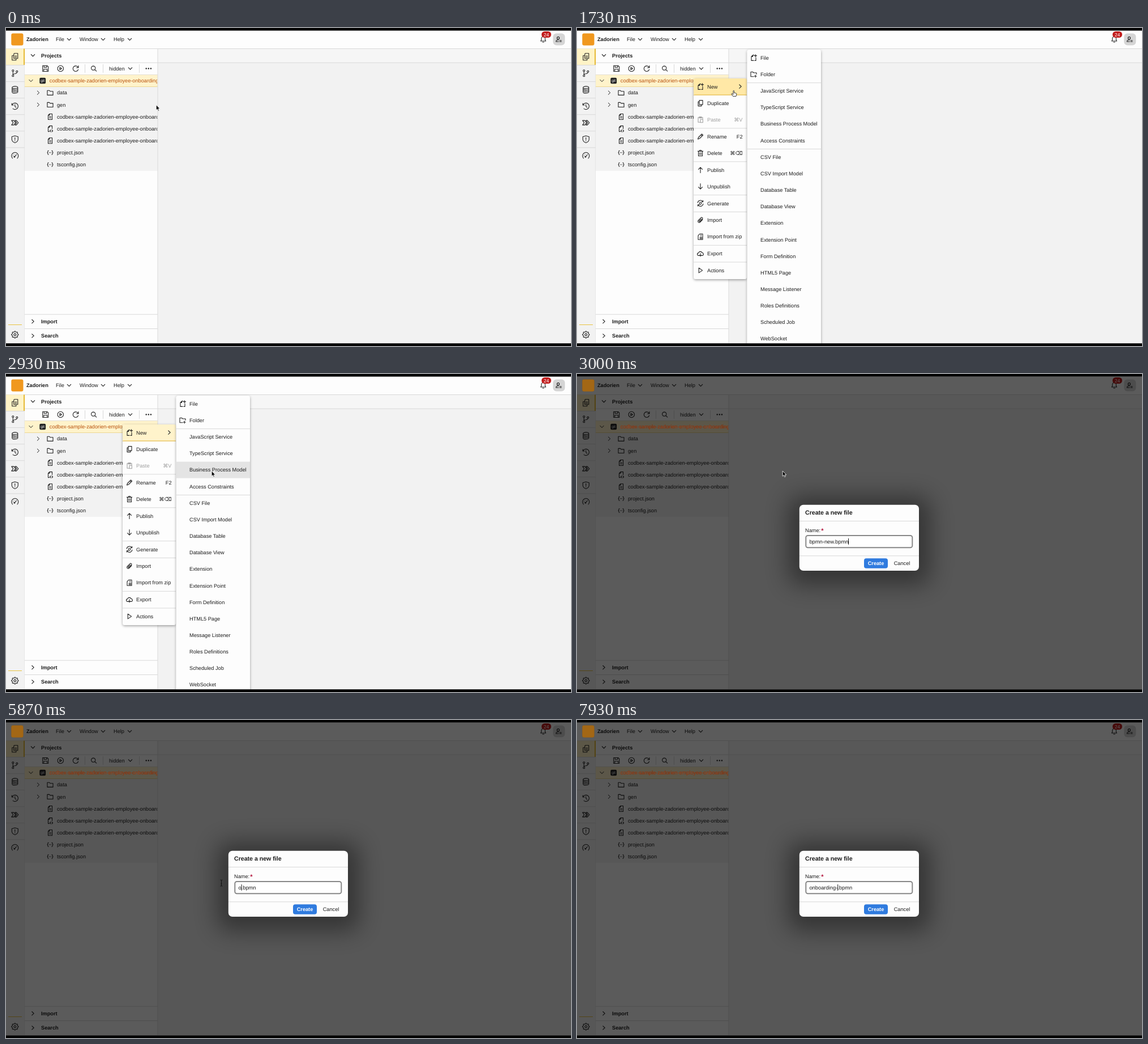
Animation, 998 px wide and 561 px high, one loop 8 s. Source, as an HTML page:

```html
<!DOCTYPE html>
<html lang="en">
<head>
<meta charset="utf-8">
<title>Project workbench</title>
<style>
html, body { margin: 0; width: 998px; height: 561px; overflow: hidden; background: #000 }
svg { display: block }
text { font: 9.2px "Liberation Sans", Arial, "DejaVu Sans", sans-serif; fill: #1c1c1c; text-rendering: geometricPrecision; white-space: pre }
.b { font-weight: 700 }
.i { fill: none; stroke: #222; stroke-width: 1.1; stroke-linejoin: round; stroke-linecap: round }
.off { opacity: .42 }
</style>
</head>
<body>
<svg id="stage" width="998" height="561" viewBox="0 0 998 561"></svg>
<script>
const rect = (x, y, w, h, fill, more = '') =>
  `<rect x="${x}" y="${y}" width="${w}" height="${h}" fill="${fill}" ${more}/>`;
const text = (x, cy, s, more = '') => `<text x="${x}" y="${cy + 3.2}" ${more}>${s}</text>`;
const icon = (x, y, d, more = '') => `<path class="i" transform="translate(${x} ${y})" d="${d}" ${more}/>`;
const group = (id, body) => `<g id="${id}">${body}</g>`;
const ring = (x, y, r) => `M${x - r} ${y}a${r} ${r} 0 1 0 ${2 * r} 0a${r} ${r} 0 1 0 ${-2 * r} 0`;
const hline = (x, y, w, c = '#d9d9d9') => rect(x, y, w, 1, c);
const vline = (x, y, h, c = '#d9d9d9') => rect(x, y, 1, h, c);

const down = 'M-3.2-1.7L0 1.7 3.2-1.7', right = 'M-1.7-3.2L1.7 0-1.7 3.2';
const gear = 'M' + Array.from({ length: 32 }, (_, i) => {
  const a = (i - .5) * Math.PI / 16, r = i % 4 < 2 ? 6.1 : 4.8;
  return (r * Math.cos(a)).toFixed(2) + ' ' + (r * Math.sin(a)).toFixed(2);
}).join('L') + 'Z' + ring(0, 0, 1.9);
const folder = 'M-5-4H-1.5L0-2.5H5V4.2H-5Z';
const doc = 'M-1-5H3.5V5H-3.5V-2.5ZM-3.5-2.5H-1V-5M-1.5 0H1.5M-1.5 2.3H1.5';
const code = 'M-1-5H3.5V0M-3.5 5V-2.5L-1-5M-3.5-2.5H-1V-5M-3.5 5H-1.8M1 2.3L-.6 3.9 1 5.5M3 2.3L4.6 3.9 3 5.5';
const json = 'M-3-3.5C-5-3.5-3.4 0-5 0C-3.4 0-5 3.5-3 3.5M3-3.5C5-3.5 3.4 0 5 0C3.4 0 5 3.5 3 3.5M-1.5 0h.5M1 0h.5';
const newDoc = 'M0 5H-4V-2L-1.5-4.5H1M-4-2H-1.5V-4.5M4 0V5H2M3.5-5.5V-1.5M1.5-3.5H5.5';

const side = [
  'M-1-6H5V3H-2V-4.8ZM-2-2H-5V6H2V3M0-1.5H3M0 .8H3',
  'M-3.5-3V3M3.5-1.5C3.5 2-3.5 0-3.5 3' + ring(-3.5, -4.5, 1.5) + ring(-3.5, 4.5, 1.5) + ring(3.5, -3, 1.5),
  'M-5-4a5 2 0 1 0 10 0a5 2 0 1 0-10 0V4a5 2 0 0 0 10 0V-4M-5-1.3a5 2 0 0 0 10 0M-5 1.4a5 2 0 0 0 10 0',
  'M-5.2-2A5.6 5.6 0 1 1-3.6 4.3M-5.5-5V-2H-2.5M0-3V.3L2 2',
  'M-6-4H-2L1 0-2 4H-6L-3 0ZM0-4H2.5L6 0 2.5 4H0L3 0Z',
  'M0-6L5.5-4.5V0C5.5 3 3 5.2 0 6.2-3 5.2-5.5 3-5.5 0V-4.5ZM0-3V.7M0 2.5V3',
  'M-4.2 4.5A6 6 0 1 1 4.2 4.5M-.5 1.5L2.6-2M-3.4 0h.1M-1.8-2.6h.1' + ring(-.9, 2, .9)
];
const tools = [
  [69.7, 'M-5-5H3L5-3V5H-5ZM-2.5-5V-2H2V-5M-3 5V1H3V5'],
  [96.3, ring(0, 0, 5.2) + 'M-1.3-2L2.2 0-1.3 2Z'],
  [123, 'M4.6-1.5A4.8 4.8 0 1 0 4.6 1.8M4.9-5V-1.5H1.5'],
  [155, ring(-.8, -.8, 3.6) + 'M1.8 1.8L4.7 4.7']
];
const project = 'codbex-sample-zadorien-employee-onboarding';
const tree = [[folder, 'data'], [folder, 'gen'], [doc, project], [code, project], [doc, project],
  [json, 'project.json'], [json, 'tsconfig.json']];

function base() {
  let s = rect(0, 0, 998, 561, '#f2f2f2') + rect(0, 0, 998, 36, '#fdfdfd') + hline(0, 36, 998);
  s += rect(9.3, 9.5, 21.2, 21.2, '#f0981f', 'rx="3"') + text(36, 20, 'Zadorien', 'class="b"');
  for (const [x, label, cx] of [[88, 'File', 111.5], [130, 'Window', 171.5], [190, 'Help', 218.5]])
    s += text(x, 20, label) + icon(cx, 20, down);
  s += icon(949, 20, 'M-4.5 3H4.5L3.3 1V-1.5A3.3 3.3 0 0 0-3.3-1.5V1ZM-1.3 5H1.3');
  s += rect(946, 6, 17, 11, '#c11b1b', 'rx="5.5"') + text(954.5, 11.5, '24', 'text-anchor="middle" style="fill:#fff;font-size:8.6px"');
  s += rect(966.3, 9.5, 21, 21, '#d5d5d5', 'rx="6"') +
    icon(976, 20, ring(-.6, -2.3, 2.1) + 'M-4.5 4C-4.5.7-1.5.8 0 1.2M-4.5 4H0M2 2H5M2 4H5');

  s += vline(32.5, 36, 520) + rect(0, 36.5, 33, 29, '#fff3c6') + rect(31.2, 36.5, 1.8, 29, '#e3b322');
  side.forEach((d, i) => {
    s += icon(15.8, 50.7 + i * 29.1, d);
    if (i < 6) s += hline(0, 65 + i * 29.1, 33);
  });
  s += hline(4, 523, 24, '#e9c33f') + icon(15.8, 541, gear);

  s += rect(33, 36.5, 235, 519.5, '#fdfdfd') + hline(33, 36, 235) + rect(268, 37, 730, 24, '#f6f6f6');
  s += icon(47.5, 48.3, down) + text(62, 48.3, 'Projects', 'class="b"') + hline(33, 60.7, 965);
  for (const [x, d] of tools) s += icon(x, 71.5, d);
  for (const x of [139, 171, 235]) s += vline(x, 64, 15);
  s += text(182, 71.5, 'hidden') + icon(219.5, 71.5, down);
  for (const x of [247.7, 251.8, 255.9]) s += `<circle cx="${x}" cy="71.5" r="1.2" fill="#222"/>`;

  s += rect(33, 82, 235, 170, '#f2f2f2') + rect(33, 82.3, 235, 21, '#fff3cb') +
    hline(33, 82, 235, '#e5e0d0') + hline(33, 103, 235, '#ecd894');
  s += icon(44, 93, down, 'style="stroke-width:1"') + rect(59.3, 87.8, 10.8, 10.5, '#222', 'rx="2"') +
    text(64.7, 92.2, 'git', 'text-anchor="middle" style="fill:#fff;font-size:6.6px"');
  let rows = text(76.8, 93, project, 'style="fill:#b8520c"');
  tree.forEach(([d, label], i) => {
    const y = 114.2 + i * 21.13;
    rows += icon(78, y, d) + text(90, y, label);
    if (i < 2) rows += icon(57, y, right, 'style="stroke-width:1"');
  });
  s += `<g clip-path="url(#panel)">${rows}</g>`;
  [[517.7, 'Import'], [543, 'Search']].forEach(([y, label]) => {
    s += hline(33, y - 13, 235) + icon(47.5, y, right) + text(62, y, label, 'class="b"');
  });
  return s + vline(267.5, 36, 520);
}

const actions = [
  ['New', newDoc], ['Duplicate', 'M-2-5H4V2.5H-2ZM-2-2.5H-4V5H2V2.5'],
  ['Paste', 'M-1 4.5H-4V-4H4V-1.5M-2-5H2V-3H-2ZM0-.5H4.3V5H0Z', '⌘V'],
  ['Rename', 'M-4.5 4.5L-3.5 1.5 2.5-4.5 4.5-2.5-1.5 3.5ZM1-3L3-1', 'F2'],
  ['Delete', 'M-4.5-3.3H4.5M-1.5-3.3V-5H1.5V-3.3M-3.5-3.3V5H3.5V-3.3M-1.2-1V3M1.2-1V3', '⌘⌫'],
  ['Publish', 'M0 5V-4.5M-3.5-1L0-4.5 3.5-1'], ['Unpublish', 'M0-5V4.5M-3.5 1L0 4.5 3.5 1'],
  ['Generate', 'M-4.8-1A4.8 4.8 0 0 1 4-3M4.6-5V-2.6H2M4.8 1A4.8 4.8 0 0 1-4 3M-4.6 5V2.6H-2' + ring(0, 0, 1.8)],
  ['Import', 'M3.8-1L-.8 3.8A2.3 2.3 0 0 1-4 .6L1-4.3A1.7 1.7 0 0 1 3.5-2L-1 2.3A.8.8 0 0 1-2.2 1L1.3-2.4'],
  ['Import from zip', 'M-1-5H4V5H-4V-2ZM1-4V-3M1-2V-1M-.5 1H2.3V3.5H-.5Z'],
  ['Export', 'M-2 3.5H-3.2A2.2 2.2 0 0 1-3.3-1A3.2 3.2 0 0 1 2.8-1.5A2.5 2.5 0 0 1 3 3.5H2M0 0V4.5M-1.6 3L0 4.5 1.6 3'],
  ['Actions', 'M-2.8-4.3L3.6 0-2.8 4.3Z']
];
const kinds = ['File', 'Folder', 'JavaScript Service', 'TypeScript Service', 'Business Process Model',
  'Access Constraints', 'CSV File', 'CSV Import Model', 'Database Table', 'Database View', 'Extension',
  'Extension Point', 'Form Definition', 'HTML5 Page', 'Message Listener', 'Roles Definitions',
  'Scheduled Job', 'WebSocket'];
const shadow = 'rx="4" filter="url(#soft)"';
const kindY = i => 52.4 + i * 29.1 + (i > 1) * .4 + (i > 5) * .4;

function contextMenu() {
  let s = rect(206, 89, 94, 354, '#fdfdfd', shadow) + rect(206, 89, 94, 29, '#fff3cb', 'id="newRow" rx="3"') +
    hline(206, 117.6, 94, '#dfb02c');
  let y = 103.4;
  actions.forEach(([label, d, keys], i) => {
    const row = icon(218, y, d) + text(230, y, label) +
      (keys ? text(292.5, y, keys, 'text-anchor="end"') : '');
    s += i == 2 ? `<g class="off">${row}</g>` : row;
    y += 29.2;
    if ([2, 4, 6, 7, 9, 10].includes(i)) { s += hline(206, y - 14.6, 94); y += .5; }
  });
  return s + icon(288.5, 103.2, right);
}
function subMenu() {
  let s = rect(300.5, 38.3, 130.5, 540, '#fdfdfd', shadow) + rect(300.5, 0, 130.5, 29, '#e4e4e4', 'id="hover"');
  kinds.forEach((label, i) => s += text(324, kindY(i), label));
  return s + icon(312, 52.4, newDoc) + icon(312, 81.5, 'M0 4.2H-5V-4H-1.5L0-2.5H5V0M3.2 1.5V5.5M1.2 3.5H5.2') +
    hline(300.5, 96.2, 130.5) + hline(300.5, 213, 130.5);
}
function dialog() {
  return rect(0, 4.5, 998, 552, '#000', 'opacity=".64"') +
    rect(9.3, 9.5, 21.2, 21.2, '#f0981f', 'rx="3" opacity=".5"') +
    `<g clip-path="url(#panel)">${text(76.8, 93, project, 'style="fill:#a8421a"')}</g>` +
    rect(373, 216, 251, 156, '#000', 'rx="20" opacity=".4" style="filter:blur(20px)"') +
    rect(392.8, 230.7, 211.2, 116.3, '#fdfdfd', 'rx="7"') +
    text(403, 245, 'Create a new file', 'class="b" style="font-size:10.6px"') + hline(393, 259, 211) +
    text(403, 275.3, 'Name:') + text(431.3, 276.3, '*', 'class="b" style="fill:#b3123a;font-size:11px"') +
    rect(404.3, 285, 188, 21.3, '#fff', 'rx="3.5" stroke="#888" stroke-width="2"') +
    '<rect id="mark" y="289.5" height="12" fill="#b5d5fb"/>' +
    text(410.4, 295.6, '', 'id="field" style="font-size:9.35px"') +
    rect(0, 290, .9, 11, '#000', 'id="caret"') + hline(393, 320.3, 211) +
    rect(507, 325.3, 42, 17.4, '#2f7bdf', 'rx="4"') +
    text(528, 334.1, 'Create', 'class="b" text-anchor="middle" style="fill:#fff"') +
    text(574, 334.1, 'Cancel', 'text-anchor="middle"');
}

const arrow = 'M0 0V9.3L2.1 7.4 3.6 10.7 5.1 10 3.7 6.9H6.6Z';
const hand = 'M-.9.8C-.9-.4.8-.4.8.8V4L3 4.3C5 4.6 5.2 5.2 5 6.5L4.2 10H-1.2L-3.8 6.3C-4.4 5.2-3.3 4.7-2.5 5.5L-.9 7Z';
const beam = 'M-1.8-5.5Q0-5.5 0-4.3Q0-5.5 1.8-5.5M0-4.3V4.3M-1.8 5.5Q0 5.5 0 4.3Q0 5.5 1.8 5.5M-1 1.5H1';
const stage = document.getElementById('stage');
stage.innerHTML = `<defs><clipPath id="panel"><rect x="33" y="36" width="234.5" height="520"/></clipPath>
  <filter id="soft" x="-20%" y="-10%" width="140%" height="120%"><feDropShadow dx="0" dy="1.5" stdDeviation="2.2" flood-opacity=".38"/></filter></defs>` +
  base() + group('context', contextMenu()) + group('sub', subMenu()) +
  rect(0, 0, 998, 4.6, '#000') + rect(0, 556.3, 998, 5, '#000') + group('modal', dialog()) +
  group('cursor', `<path id="pointer" stroke="#fff" stroke-width=".8"/>
    <path id="ibeam" d="${beam}" fill="none" stroke="#111" stroke-width="1"/>`);

const el = id => document.getElementById(id);
const show = (id, on) => el(id).setAttribute('display', on ? 'inline' : 'none');
const set = (id, attrs) => { for (const k in attrs) el(id).setAttribute(k, attrs[k]); };

// time, x, y of the pointer
const path = [[70, 265.3, 135.7], [670, 205.5, 89], [1060, 205.5, 89], [1660, 276.8, 110.5], [1830, 276.8, 110.5],
  [2100, 312, 117], [2600, 363.2, 171], [3270, 363.2, 171], [4070, 452, 294.3], [4670, 452, 294.3], [5130, 380.5, 287.6]];
function pointerAt(t) {
  const i = path.findIndex(p => p[0] > t);
  if (i <= 0) return path[i ? path.length - 1 : 0].slice(1);
  const [a, b] = [path[i - 1], path[i]];
  let k = (t - a[0]) / (b[0] - a[0]);
  k = k * k * (3 - 2 * k);
  return [a[1] + (b[1] - a[1]) * k, a[2] + (b[2] - a[2]) * k];
}

const pen = document.createElement('canvas').getContext('2d');
pen.font = '9.35px "Liberation Sans", Arial, sans-serif';
const edge = s => 410.4 + pen.measureText(s).width;
const oldName = 'bpmn-new', newName = 'onboarding-', suffix = '.bpmn';
const keyTimes = [5870, 6000, 6200, 6450, 6670, 6870, 7000, 7130, 7330, 7470, 7800];

function drawField(t, x) {
  const name = t < 5530 ? oldName : newName.slice(0, keyTimes.filter(k => k <= t).length);
  el('field').textContent = name + suffix;
  const end = edge(name), dragging = t >= 4670 && t < 5530;
  let from = name.length;
  if (dragging) while (from && edge(name.slice(0, from)) > x + 2) from--;
  const start = edge(name.slice(0, from));
  set('mark', { x: start, width: end - start });
  set('caret', { x: t < 4270 ? edge(name + suffix) - .4 : end });
  show('caret', !(t >= 3500 && t < 4000) && !(dragging && from < name.length));
}

function frame(now) {
  const t = now % 8000, [x, y] = pointerAt(t);
  const modal = t >= 3000, menu = t >= 930 && !modal, sub = t >= 1330 && !modal;
  show('context', menu);
  show('sub', sub);
  show('modal', modal);
  const onNew = menu && x > 206 && x < 300;
  set('newRow', { fill: onNew ? '#ffe8a6' : sub ? '#fff3cb' : '#fdfdfd' });
  const row = kinds.findIndex((_, i) => Math.abs(kindY(i) - y) <= 14.6);
  show('hover', sub && x > 300.5 && row >= 0);
  if (row >= 0) set('hover', { y: kindY(row) - 14.5 });
  if (modal) drawField(t, x);

  const inField = modal && (t >= 4670 || (x > 404 && y > 285));
  const overItem = menu && x > 206.5 && t < 2870;
  show('cursor', t < 5930);
  show('ibeam', inField);
  show('pointer', !inField);
  set('pointer', { d: overItem ? hand : arrow, fill: overItem ? '#fff' : '#000', stroke: overItem ? '#111' : '#fff' });
  set('cursor', { transform: `translate(${x.toFixed(2)} ${y.toFixed(2)})` });
}
const begin = performance.now();
function tick() {
  frame(performance.now() - begin);
  requestAnimationFrame(tick);
}
tick();
</script>
</body>
</html>
```
